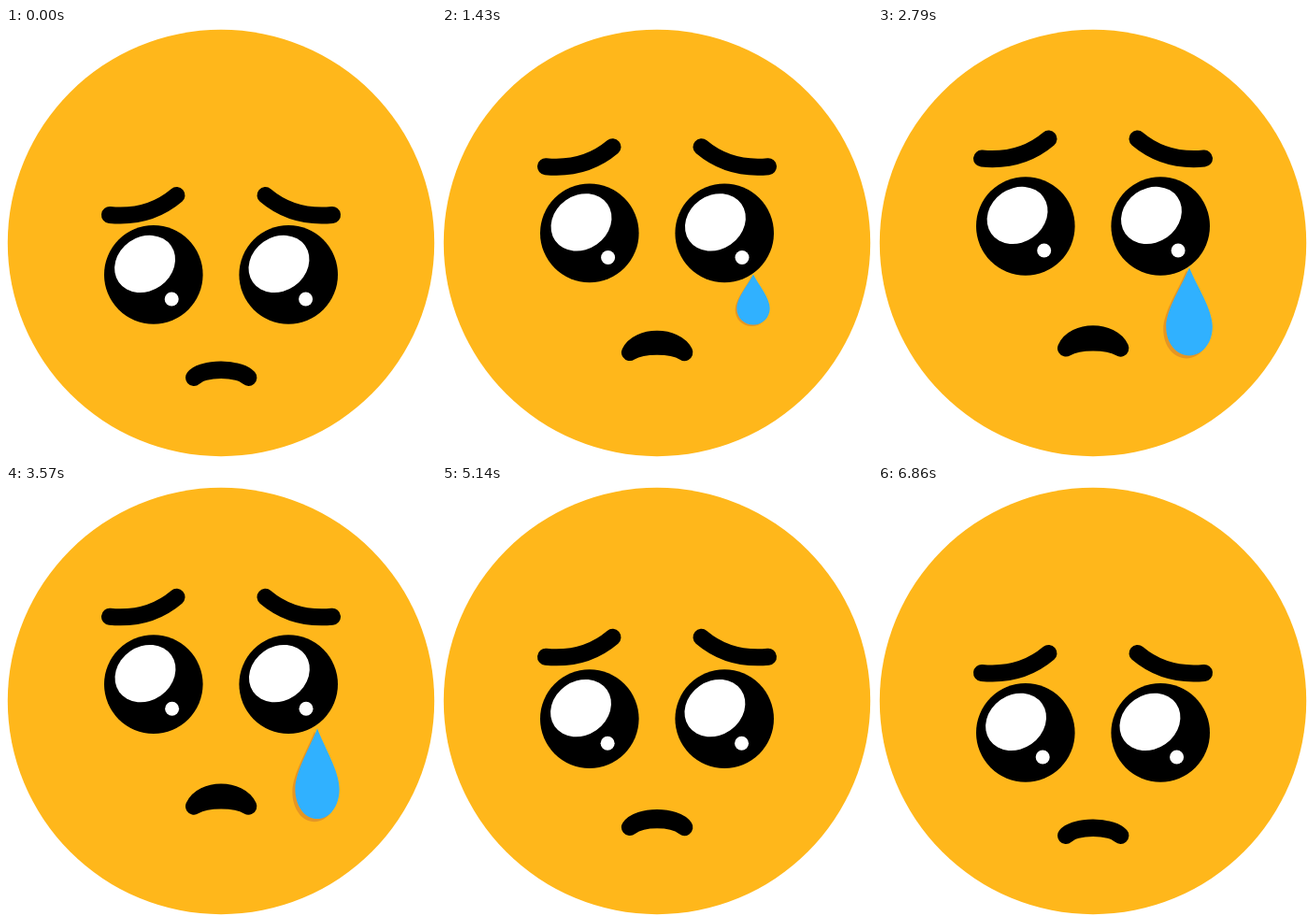
These frames come from a looping animation (460 by 460 pixels, 6930 ms). An HTML page:

```html
<!DOCTYPE html>
<html lang="en">
<head>
<meta charset="utf-8">
<title>Tearful face</title>
<style>
  html, body { margin: 0; width: 100%; height: 100%; overflow: hidden; background: #fff; }
  svg { display: block; width: 100%; height: 100%; }
  .line { stroke: #000; stroke-width: 18; stroke-linecap: round; stroke-linejoin: round; }
</style>
</head>
<body>
<svg viewBox="0 0 460 460">
  <defs>
    <path id="brow" class="line" fill="none" d="M111 200Q153 204 182.5 179"/>
    <g id="shine" fill="#fff">
      <ellipse rx="34.1" ry="28.8" transform="translate(148.6 252.4) rotate(-35)"/>
      <circle cx="177.2" cy="290" r="7.5"/>
    </g>
  </defs>
  <circle cx="230" cy="230" r="228.2" fill="#ffb71b"/>
  <g id="brows">
    <use href="#brow"/>
    <use href="#brow" transform="translate(460) scale(-1 1)"/>
  </g>
  <g id="eyes">
    <circle cx="157.8" cy="263.9" r="52.8"/>
    <circle cx="302.2" cy="263.9" r="52.8"/>
    <g id="shines">
      <use href="#shine"/>
      <use href="#shine" x="143.4"/>
    </g>
  </g>
  <path id="mouth" class="line"/>
  <path id="shadow" fill="rgba(190,100,50,.4)"/>
  <path id="tear" fill="#30b1ff"/>
</svg>
<script>
const LOOP = 6930, RISE = 60.5, EYE_RISE = .86;
const $ = id => document.getElementById(id);

// Both run from 0 to 1: a quick start that settles, and a symmetric S-curve
const settle = t => 1 - Math.exp(-((Math.max(0, t) / 1011) ** 1.9));
const sigmoid = (t, mid, width) => 1 / (1 + Math.exp((mid - t) / width));

function mouthPath(up) {
  const end = 374 - .52 * up;
  const bend = mid => end + (mid - end) * 4 / 3;
  const top = bend(366 - .64 * up), low = bend(365.5 - .48 * up);
  return `M201 ${end}C210 ${top} 250 ${top} 259.4 ${end}C246 ${low} 214 ${low} 201 ${end}Z`;
}

function dropPath(x, y, w, h) {
  const at = (u, v) => `${x + u * w} ${y + v * h} `;
  const half = side => `M${at(0, 0)}C${at(.15 * side, .2)}${at(.5 * side, .47)}${at(.5 * side, .67)}` +
    `C${at(.5 * side, .86)}${at(.28 * side, 1)}${at(0, 1)}Z`;
  return half(1) + half(-1);
}

function draw(t) {
  const sec = t / 1000, rise = RISE * settle(t), fall = sigmoid(t, 4910, 250);
  const up = rise * (1 - fall);
  const move = (id, x, y) => $(id).setAttribute("transform", `translate(${x} ${y})`);
  move("brows", 0, -up);
  move("eyes", 0, -EYE_RISE * up);
  move("shines", .4 * sec - .08 * sec * sec, 0);
  $("mouth").setAttribute("d", mouthPath(up));

  // The tear hangs from the eye while it grows and slims, then drops away
  const y = 308 - EYE_RISE * rise + 720 * fall;
  const h = 97 * settle((t - 280) / 1.27);
  const w = h * (.695 - .22 * sigmoid(t, 2200, 500));
  const off = h / 32;
  $("tear").setAttribute("d", dropPath(333, y, w, h));
  $("shadow").setAttribute("d", dropPath(333 - off, y + off, w, h));
}

const start = performance.now();
function tick() {
  draw((performance.now() - start) % LOOP);
  requestAnimationFrame(tick);
}
tick();
</script>
</body>
</html>
```
